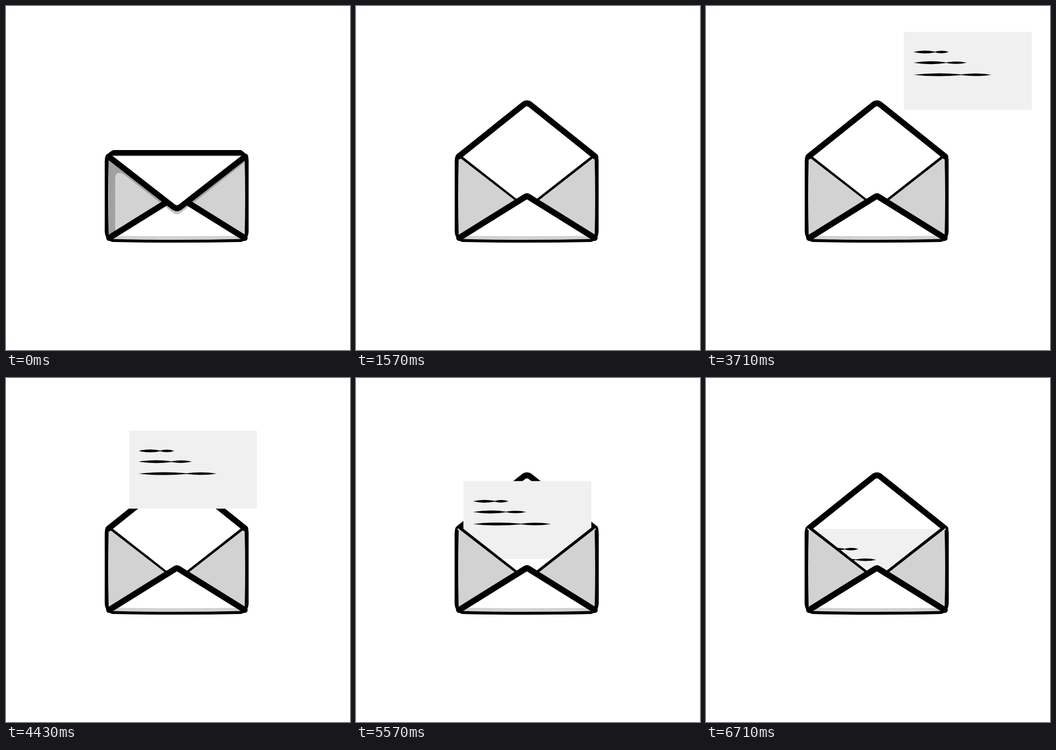
An HTML page for the animation above (8 s loop, 640 px wide and 640 px high).

```html
<!DOCTYPE html>
<html lang="en">
<head>
<meta charset="utf-8">
<title>Envelope</title>
<style>
  html, body { margin: 0; width: 100%; height: 100%; overflow: hidden; background: #fff; }
  svg { display: block; width: 100%; height: 100%; }
</style>
</head>
<body>
<svg viewBox="0 0 640 640">
  <defs>
    <g id="front">
      <path fill="#d2d2d2" d="M189 279L299 364L189 430ZM446 279L337 364L446 430Z"/>
      <path fill="#fff" d="M192 431L318 353L444 431V436H192Z"/>
      <path fill="#d2d2d2" d="M196 427.5Q318 429 440 427.5V436H196Z"/>
      <path fill="none" stroke="#000" stroke-width="11.2" stroke-linecap="round"
            d="M192 431.5L315 355Q318 353.1 321 355L444 431.5"/>
      <path d="M186 277.5Q183.7 282 183.7 290V420Q185 436 198 439Q318 441.5 437 439Q450 436 451.4 420V290Q451.4 282 449.5 277.5L444 284Q446 355 444 428L437 433.5Q318 436.7 198 433.5L191 427Q189 355 191 284Z"/>
    </g>
    <path id="seams" fill="none" stroke="#000" d="M191 277.8L300 363.4M444 277.8L335 363.4"/>
  </defs>
  <path fill="#fff" d="M188 278H447V434H188Z"/>
  <use href="#seams" stroke-width="5.4"/>
  <use href="#front"/>
  <path d="M186 279Q192 271 200 268H437Q443 271 449 279L440 278.5H197Z"/>
  <path id="shadow" d="M191 279.5H444V291L325 385Q318 390 311 385L219 313Q205 306 203 319V430H191Z"/>
  <path id="flap" fill="#fff" stroke="#000" stroke-width="10.9" stroke-linecap="round"/>
  <g id="letter">
    <rect width="238" height="145" fill="#f0f0f0"/>
    <path id="lines"/>
  </g>
  <g id="pocket">
    <use href="#seams" stroke-width="6.8"/>
    <use href="#front"/>
  </g>
</svg>
<script>
const LOOP = 8000, STEPS = 112;
const HINGE = 280, SHUT = 379, OPEN = 178.3;
const PEAK = 52, DROP = 63.7, REST = 94;
const $ = id => document.getElementById(id);
const clamp = v => Math.min(1, Math.max(0, v));

// Pen stroke: two tapered lenses joined by a thin waist
const scribble = (x0, waist, x1, y) => {
  const a = (x0 + waist) / 2, b = (waist + x1) / 2;
  return `M${x0} ${y}Q${a} ${y - 5} ${waist} ${y - 0.6}Q${b} ${y - 4.4} ${x1} ${y}` +
         `Q${b} ${y + 4.4} ${waist} ${y + 0.6}Q${a} ${y + 5} ${x0} ${y}Z`;
};
$('lines').setAttribute('d',
  scribble(18, 58, 84, 37.6) + scribble(18, 79, 117, 57.5) + scribble(18, 107, 163, 79.9));

function flapPath(tip) {
  const slope = (tip - HINGE) / 127, y = tip - slope * 7;
  return `M191 ${HINGE}L311 ${y}Q318 ${tip} 325 ${y}L445 ${HINGE}`;
}

// Rises in from the right, arcs over the top, then slides straight down
function letterAt(n) {
  const m = n - PEAK;
  if (m < 0) return [368 - 11.5 * m + 0.74 * m * m, 48 + 1.333 * m * m];
  if (n < DROP) return [368 - 11.5 * m - 0.24 * m * m, 48 + 67 * (m / 12) ** 1.6];
  return [199.8, 280.7 - 5.56 * Math.max(0, REST - n)];
}

function draw(t) {
  const n = Math.floor(t * STEPS / LOOP + 0.08);
  const left = 1 - clamp((n - 0.78) / 20.7);
  $('flap').setAttribute('d', flapPath(OPEN + (SHUT - OPEN) * left ** 3));
  $('shadow').setAttribute('opacity', 0.235 * left ** 2);

  const [x, y] = letterAt(n);
  $('letter').setAttribute('transform', `translate(${x} ${y})`);
  $('letter').setAttribute('display', n < 40 ? 'none' : 'inline');
  $('pocket').setAttribute('display', n < DROP ? 'none' : 'inline');
}

let start;
function tick(now) {
  start ??= now;
  draw((now - start) % LOOP);
  requestAnimationFrame(tick);
}
draw(0);
requestAnimationFrame(tick);
</script>
</body>
</html>
```
